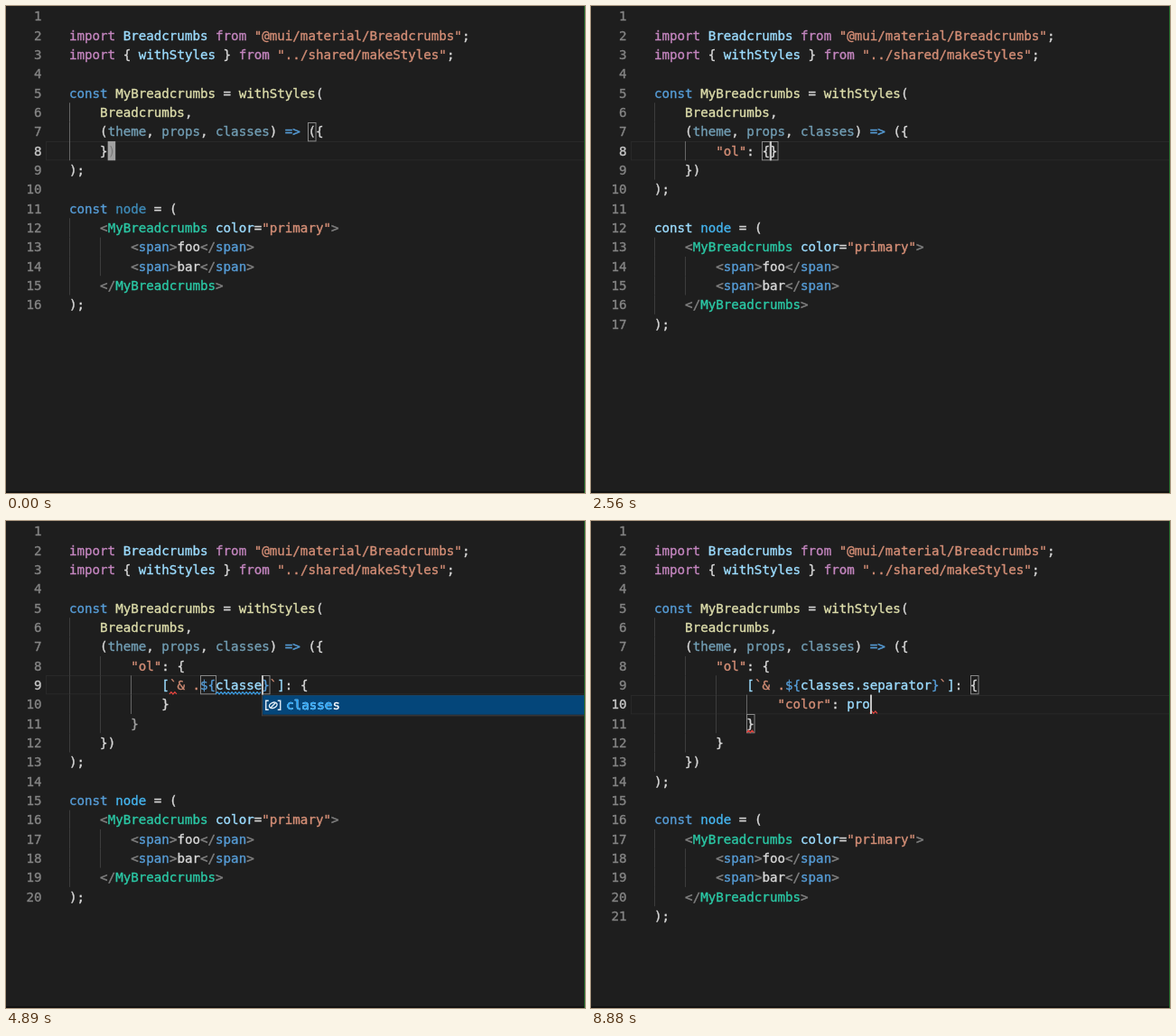
Recreate the animation shown at these times as an HTML page with a canvas. Size 641 px wide and 540 px high, loop 9090 ms.

```html
<!DOCTYPE html>
<html lang="en">
<head>
<meta charset="utf-8">
<title>Typing a styled component</title>
<style>
  html, body { margin: 0; width: 100%; height: 100%; overflow: hidden; background: #1e1e1e; }
  canvas { display: block; }
</style>
</head>
<body>
<canvas id="editor" width="641" height="540"></canvas>
<script>
const ctx = document.getElementById('editor').getContext('2d');
const LOOP = 9090, LEFT = 70, CHAR = 8.53, ROW = 21.33, FONT = '"DejaVu Sans Mono", monospace';
const RED = '#e5443f', BLUE = '#3b9be0';

// "~x" inside a line switches to colour x
const colors = {
  w: '#d8d8d8', d: '#a0a0a0', p: '#c586c0', b: '#9cdcfe', s: '#d48e76', c: '#569cd6', y: '#dcdcaa',
  u: '#719db3', m: '#3f8bb8', v: '#45b4ee', t: '#2bc9a6', g: '#808080', r: RED
};

const head = [
  '',
  '~pimport ~bBreadcrumbs ~pfrom ~s"@mui/material/Breadcrumbs"~w;',
  '~pimport ~w{ ~bwithStyles ~w} ~pfrom ~s"../shared/makeStyles"~w;',
  '',
  '~cconst ~yMyBreadcrumbs ~w= ~ywithStyles~w(',
  '    ~yBreadcrumbs~w,',
  '    ~w(~utheme~w, ~uprops~w, ~uclasses~w) ~c=> ~w({'
];
const span = text => `        ~g<~cspan~g>~w${text}~g</~cspan~g>`;
const tail = at => [
  '~w);',
  '',
  `~${at > 2000 && at < 3400 ? 'b' : 'c'}const ~${at < 2000 ? 'm' : 'v'}node ~w= (`,
  '    ~g<~tMyBreadcrumbs ~bcolor~w=~s"primary"~g>',
  span('foo'),
  span('bar'),
  '    ~g</~tMyBreadcrumbs~g>',
  '~w);'
];

const end = '    ~w})', olOpen = '        ~s"ol"~w: {', brace = '            ~w}';
const inOl = (...lines) => [olOpen, ...lines, '        ~d}', end];
const key = text => '            ~b[~s`' + text + '~s`~b]~w: {';
const selector = path => key('& .~c${~b' + path + '~c}');

const slots = ['li', 'ol', 'root', 'separator'];
const globals = ['classes', 'class', 'clearInterval', 'clearTimeout', 'close', 'closed', 'caches',
  'cancelIdleCallback', 'case', 'catch', 'confirm', 'console'];
const cssProps = ['color?', 'colorAdjust?', 'colorScheme?', 'columnCount?', 'columnFill?', 'columnGap?',
  'columns?', 'contain?', 'content?', 'cursor?', 'clear?', 'clip?'];
const menu = (words, typed = '', kind = 'field', selected = 0) =>
  ({ items: words.filter(word => word.startsWith(typed)), typed, kind, selected });

const scenes = [];
const scene = (at, body, row, col, extra = {}) =>
  scenes.push({ at, body, row, col, boxes: [], waves: [], ...extra });

// Open a line and pick the slot
scene(0, [end], 8, 5, { block: true, boxes: [[7, 31]] });
scene(330, ['        ', end], 8, 8);
const quoted = ['        ~s"', '    ~r})'];
const unclosed = { broken: true, boxes: [[7, 31], [10, 0]], waves: [[8, 9, 1, RED], [9, 4, 1, RED]] };
const optional = slots.map(name => name + '?');
scene(670, quoted, 8, 9, unclosed);
scene(890, quoted, 8, 9, { ...unclosed, menu: menu(optional) });
scene(1440, quoted, 8, 9, { ...unclosed, menu: menu(optional, '', 'field', 1) });
scene(2110, ['        ~s"ol', '    ~r})'], 8, 11, unclosed);
scene(2220, ['        ~s"ol"', end], 8, 12);
scene(2330, ['        ~s"ol"~w:', end], 8, 13);
scene(2440, ['        ~s"ol"~w: ', end], 8, 14);
scene(2560, [olOpen + '}', end], 8, 15, { boxes: [[8, 14], [8, 15]] });

// Nested selector
scene(2670, inOl('            '), 9, 12);
scene(2780, inOl('            ~b[]'), 9, 13, { boxes: [[9, 12], [9, 13]] });
scene(2890, inOl('            ~b[]~w: '), 9, 16);
scene(3000, inOl('            ~b[]~w: {'), 9, 17);
scene(3110, [olOpen, '            ~b[]~w: {', '            ', '        ~w}', end], 10, 16,
  { boxes: [[9, 16], [11, 8]], waves: [[11, 9, 1, RED], [12, 4, 1, RED]] });
scene(3220, inOl('            ~b[]~w: {', brace), 10, 13, { boxes: [[9, 16], [10, 12]] });
scene(3440, inOl('            ~b[]~w: {', brace), 9, 13, { boxes: [[9, 12], [9, 13]] });
['', '&', '& ', '& .', '& .$'].forEach((text, i) => {
  const col = 14 + text.length;
  scene(3665 + i * 111, inOl(key(text), brace), 9, col,
    { boxes: [[9, 12], [9, col + 1]], waves: [[9, col + 1, 1, RED]] });
});

function typePath(at, path, list, invalid) {
  const col = 19 + path.length;
  scene(at, inOl(selector(path), brace), 9, col, {
    boxes: [[9, 17, 2], [9, col]],
    waves: invalid ? [[9, 13, 1, RED], [9, 19, path.length, BLUE]] : [],
    menu: list
  });
}
typePath(4220, '');
for (let n = 1; n <= 6; n++) {
  const typed = 'classes'.slice(0, n);
  typePath(4220 + n * 111, typed, menu(n > 4 ? ['classes'] : globals, typed, 'variable'), true);
}
typePath(5000, 'classes');
typePath(5110, 'classes.', menu(slots));
typePath(5330, 'classes.s', menu(slots, 's'));
typePath(5440, 'classes.se', menu(slots, 'se'));
typePath(5670, 'classes.separator');

// Style rule
const rule = selector('classes.separator');
scene(7000, inOl(rule, brace), 9, 37);
scene(7220, inOl(rule, brace), 9, 42, { boxes: [[9, 41], [10, 12]] });
function typeRule(at, text, list) {
  const col = 16 + text.replace(/~./g, '').length;
  const invalid = text ? [[10, col, 1, RED], [11, 12, 1, RED]] : [];
  scene(at, [olOpen, rule, '                ' + text, brace, '        ~w}', end], 10, col,
    { boxes: [[9, 41], [11, 12]], waves: invalid, menu: list });
}
typeRule(7440, '');
typeRule(7890, '~s"');
typeRule(8000, '~s"c', menu(cssProps, 'c'));
typeRule(8110, '~s"col', menu(cssProps, 'col'));
['', '~w:', '~w: ', '~w: ~bp', '~w: ~bpr'].forEach((text, i) => typeRule(8222 + i * 111, '~s"color"' + text));
typeRule(8880, '~s"color"~w: ~bpro');

const xAt = col => LEFT + col * CHAR;
const topOf = row => 0.63 + (row - 1) * ROW;

function fill(color, x, y, w, h) {
  ctx.fillStyle = color;
  ctx.fillRect(x, y, w, h);
}

function frame(color, x, y, w, h) {
  ctx.strokeStyle = color;
  ctx.lineWidth = 1;
  ctx.strokeRect(Math.round(x) + 0.5, Math.round(y) + 0.5, w, h);
}

function path(points, close) {
  ctx.beginPath();
  points.forEach(([x, y]) => ctx.lineTo(x, y));
  if (close) ctx.closePath();
  ctx.stroke();
}

// A hairline stroke gives the slightly heavy weight of the editor font
function write(text, x, top, color, size = 14.17) {
  ctx.font = `${size}px ${FONT}`;
  ctx.fillStyle = ctx.strokeStyle = color;
  ctx.lineWidth = 0.35;
  ctx.fillText(text, x, top + 15.6);
  ctx.strokeText(text, x, top + 15.6);
}

function drawLine(line, row, broken) {
  const [indent, ...parts] = line.split('~');
  let col = indent.length;
  for (const part of parts) {
    const text = part.slice(1);
    const name = broken && !'sr'.includes(part[0]) ? 'b' : part[0];
    write(text, xAt(col), topOf(row), colors[name]);
    col += text.length;
  }
}

function drawGuides(lines, current) {
  const depths = lines.map(line => line.match(/^ */)[0].length);
  const active = depths[current - 1] - 4;
  depths.forEach((depth, i) => {
    for (let col = 0; col < depth; col += 4) {
      const lit = col === active && Math.abs(i + 1 - current) < 4;
      fill(lit ? '#666' : '#3c3c3c', Math.round(xAt(col)), topOf(i + 1), 1, ROW);
    }
  });
}

function drawWave([row, col, count, color]) {
  const x = xAt(col), y = topOf(row) + 19.5, points = [];
  for (let dx = 0; dx <= count * CHAR; dx += 2) points.push([x + dx, y + (dx % 4 ? -1.2 : 1.2)]);
  ctx.strokeStyle = color;
  ctx.lineWidth = 1.2;
  path(points);
}

function drawIcon(kind, x, y, color) {
  ctx.strokeStyle = color;
  ctx.lineWidth = 1.4;
  if (kind === 'field') {
    path([[x - 7, y - 2], [x + 1, y - 6], [x + 7, y - 3], [x + 7, y + 2], [x - 1, y + 6], [x - 7, y + 3]], true);
    path([[x - 7, y - 2], [x - 1, y + 1], [x + 7, y - 3]]);
    path([[x - 1, y + 1], [x - 1, y + 6]]);
    return;
  }
  for (const side of [-1, 1]) {
    path([[x + side * 5, y - 5], [x + side * 8, y - 5], [x + side * 8, y + 5], [x + side * 5, y + 5]]);
  }
  ctx.beginPath();
  ctx.ellipse(x, y, 4.5, 3, -0.4, 0, 7);
  ctx.stroke();
  path([[x - 3, y + 3], [x + 3, y - 3]]);
}

function drawMenu({ items, typed, kind, selected }, row, col) {
  const x = xAt(col), top = topOf(row + 1) + 0.7;
  fill('#252526', x, top, 641 - x, items.length * ROW + 1);
  frame('#3f3f41', x, top, 700, items.length * ROW + 1);
  items.forEach((item, i) => {
    const y = top + i * ROW, chosen = i === selected;
    if (chosen) fill('#04467a', x + 1, y, 641 - x, ROW);
    drawIcon(kind, x + 12.5, y + 11, chosen ? '#e4eef6' : '#75beff');
    write(item, x + 27, y, chosen ? '#fff' : '#d4d4d4');
    write(typed, x + 27, y, '#25a5fb');
    if (chosen && item.endsWith('?')) {
      write(`(property) ${item}: CSSObject | undefined`, x + 229, y, '#a9c0d2', 12.17);
    }
  });
}

function draw(now) {
  const time = now % LOOP;
  const { at, body, row, col, boxes, waves, block, broken, menu: list } = scenes.findLast(s => s.at <= time);
  const lines = [...head, ...body, ...tail(at)];

  fill('#1e1e1e', 0, 0, 641, 540);
  frame('#292929', 44, topOf(row), 620, ROW - 1);
  drawGuides(lines, row);
  if (block) fill('#a0a0a0', xAt(col), topOf(row), CHAR, ROW);

  lines.forEach((line, i) => {
    const n = i + 1;
    ctx.textAlign = 'right';
    write(n, 39.5, topOf(n), n === row ? '#c8c8c8' : '#858585');
    ctx.textAlign = 'left';
    drawLine(line, n, broken && n > row);
  });

  for (const [r, c, count = 1] of boxes) frame('#888', xAt(c), topOf(r), CHAR * count, ROW - 1);
  waves.forEach(drawWave);
  if (block) write(')', xAt(col), topOf(row), '#777');
  else fill('#c4c4c4', Math.round(xAt(col)), topOf(row), 2, ROW);
  if (list) drawMenu(list, row, col);

  fill('#121212', 0, 538, 641, 2);
  fill('#236b2b', 640, 0, 1, 540);
  requestAnimationFrame(draw);
}
requestAnimationFrame(draw);
</script>
</body>
</html>
```
